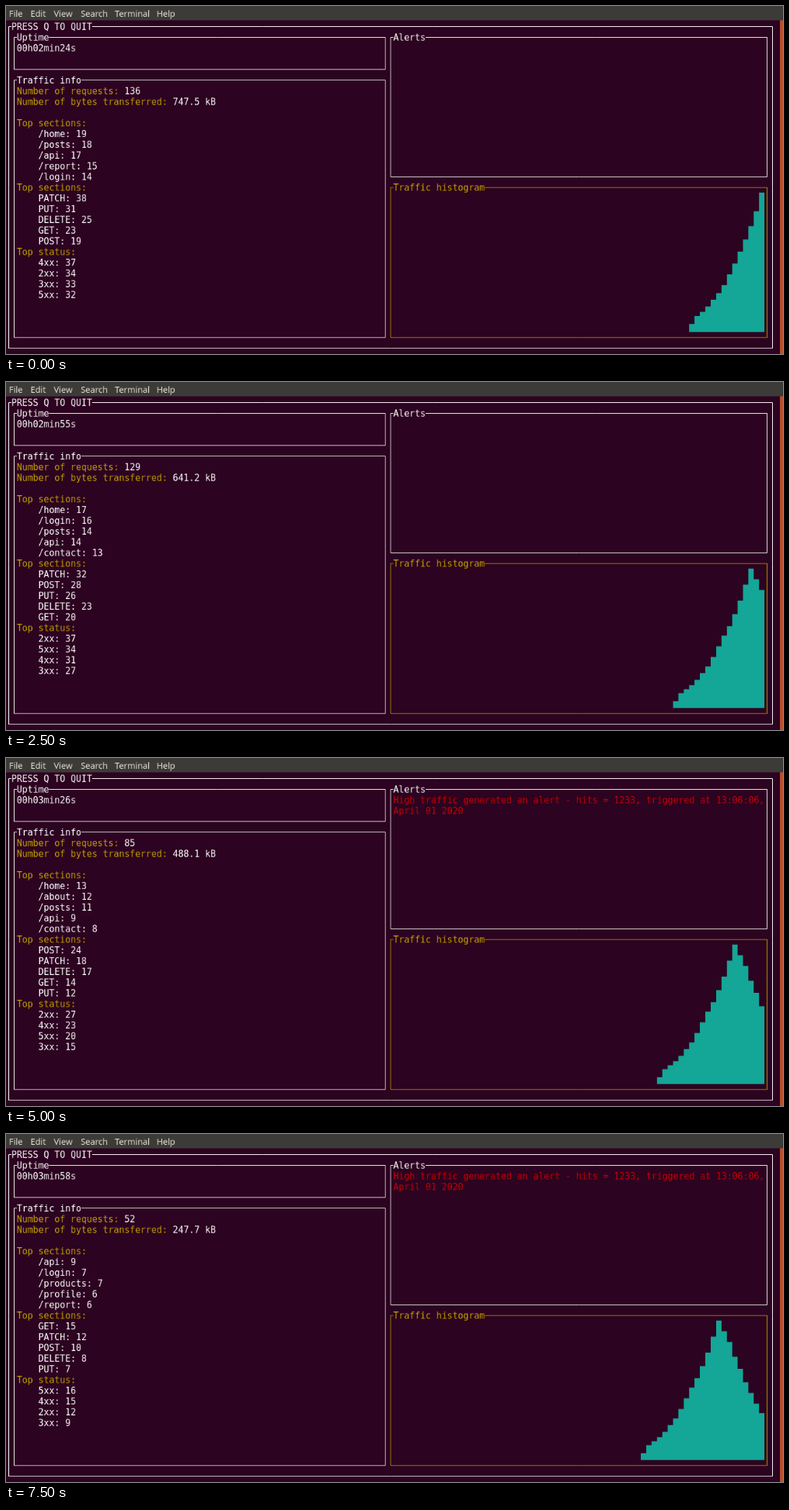
Write an HTML page with a canvas that moves like this. It is 1000 by 449 pixels and loops after 8000 ms.

```html
<!DOCTYPE html>
<html lang="en">
<head>
<meta charset="utf-8">
<title>Traffic monitor</title>
<style>
  html, body { margin: 0; width: 100%; height: 100%; overflow: hidden; background: #2c0320; }
  canvas { display: block; width: 1000px; height: 449px; }
</style>
</head>
<body>
<canvas id="stage" width="1300" height="584"></canvas>
<script>
// The terminal is drawn on its own 9 x 18 pixel grid and shown scaled down.
const canvas = document.getElementById('stage');
const ctx = canvas.getContext('2d');
const LOOP = 8000, STEP = 500;
const CELL_W = 9, CELL_H = 18, TOP = 25, BASELINE = 15;
const WHITE = '#fff', YELLOW = '#c4a000', RED = '#c80004', TEAL = '#14a697';

// Requests counted in each ten-second interval; the log below covers the last ones.
const hits = [8, 16, 20, 25, 31, 38, 46, 56, 67, 79, 90, 103, 118, 136,
              153, 141, 129, 114, 100, 85, 73, 62, 52];
const FIRST_LOGGED = 13;

// kilobytes | sections | methods | status classes
const log = [
  '747.5|home 19,posts 18,api 17,report 15,login 14|PATCH 38,PUT 31,DELETE 25,GET 23,POST 19|4xx 37,2xx 34,3xx 33,5xx 32',
  '792.6|home 20,posts 19,profile 17,api 16,cart 16|PATCH 39,PUT 33,POST 29,DELETE 28,GET 24|2xx 43,4xx 40,5xx 37,3xx 33',
  '737.4|profile 18,posts 16,home 16,api 15,cart 15|PATCH 41,POST 32,DELETE 28,PUT 27,GET 13|2xx 50,5xx 37,4xx 28,3xx 26',
  '641.2|home 17,login 16,posts 14,api 14,contact 13|PATCH 32,POST 28,PUT 26,DELETE 23,GET 20|2xx 37,5xx 34,4xx 31,3xx 27',
  '542.8|home 15,login 14,contact 13,api 13,products 13|PATCH 27,PUT 25,POST 23,GET 22,DELETE 17|2xx 32,5xx 30,4xx 29,3xx 23',
  '503.3|login 17,home 15,contact 14,posts 11,about 10|PUT 25,DELETE 23,PATCH 20,GET 16,POST 16|2xx 37,5xx 25,4xx 24,3xx 14',
  '488.1|home 13,about 12,posts 11,api 9,contact 8|POST 24,PATCH 18,DELETE 17,GET 14,PUT 12|2xx 27,4xx 23,5xx 20,3xx 15',
  '394.7|home 10,contact 10,posts 9,cart 8,about 7|POST 19,DELETE 16,PATCH 15,PUT 13,GET 10|4xx 22,2xx 19,5xx 17,3xx 15',
  '328.3|cart 8,contact 8,products 8,home 7,profile 6|DELETE 16,POST 15,PUT 13,PATCH 10,GET 8|4xx 21,5xx 17,2xx 14,3xx 10',
  '247.7|api 9,login 7,products 7,profile 6,report 6|GET 15,PATCH 12,POST 10,DELETE 8,PUT 7|5xx 16,4xx 15,2xx 12,3xx 9'
].map(line => line.split('|'));

const rowTop = row => TOP + row * CELL_H;

function write(text, col, row, color = WHITE) {
  ctx.font = '15px "DejaVu Sans Mono", monospace';
  ctx.fillStyle = color;
  [...text].forEach((char, i) =>
    ctx.fillText(char, (col + i) * CELL_W, rowTop(row) + BASELINE));
}

function field(label, value, row) {
  write(label, 2, row, YELLOW);
  write(value, 3 + label.length, row);
}

function list(title, entries, row, prefix = '') {
  write(title, 2, row, YELLOW);
  entries.split(',').forEach((entry, i) =>
    write(prefix + entry.replace(' ', ': '), 6, row + 1 + i));
}

// Lines run through cell centres; the title interrupts the top edge.
function panel(title, col, row, lastCol, lastRow, color = WHITE) {
  const x = c => (c + 0.5) * CELL_W, y = r => rowTop(r) + 9.5;
  ctx.strokeStyle = color;
  ctx.lineWidth = 1;
  ctx.beginPath();
  ctx.moveTo((col + 1) * CELL_W, y(row));
  ctx.lineTo(x(col), y(row));
  ctx.lineTo(x(col), y(lastRow));
  ctx.lineTo(x(lastCol), y(lastRow));
  ctx.lineTo(x(lastCol), y(row));
  ctx.lineTo((col + 1 + title.length) * CELL_W, y(row));
  ctx.stroke();
  write(title, col + 1, row, color);
}

function windowFrame() {
  ctx.fillStyle = '#2c0320';
  ctx.fillRect(0, 0, canvas.width, canvas.height);
  ctx.fillStyle = '#3c3b37';
  ctx.fillRect(0, 0, canvas.width, 24);
  ctx.fillStyle = '#b9502f';
  ctx.fillRect(1295, 24, 5, canvas.height);
  ctx.fillStyle = '#dfdbd2';
  ctx.font = '14.3px "Noto Sans", sans-serif';
  const items = { File: 5, Edit: 41, View: 80, Search: 125, Terminal: 182, Help: 252 };
  for (const name in items) ctx.fillText(name, items[name], 18);
}

// Bars are one cell wide and grow in eighths of a cell.
function histogram(bars) {
  const peak = Math.max(...bars), rows = 13, endCol = 141, bottom = rowTop(29);
  ctx.fillStyle = TEAL;
  bars.forEach((value, i) => {
    const height = Math.round(value / peak * rows * 8) / 8 * CELL_H;
    ctx.fillRect((endCol - bars.length + i) * CELL_W, bottom - height, CELL_W, height);
  });
}

function draw(step) {
  const uptime = Math.floor(144.3 + 6.25 * step);
  const interval = Math.floor(0.4 + 0.625 * step);
  const latest = FIRST_LOGGED + interval;
  const [bytes, sections, methods, statuses] = log[interval];
  const pad = n => String(n).padStart(2, '0');

  windowFrame();
  panel('PRESS Q TO QUIT', 0, 0, 142, 30);
  panel('Uptime', 1, 1, 70, 4);
  panel('Traffic info', 1, 5, 70, 29);
  panel('Alerts', 71, 1, 141, 14);
  panel('Traffic histogram', 71, 15, 141, 29, YELLOW);

  write(`00h${pad(Math.floor(uptime / 60))}min${pad(uptime % 60)}s`, 2, 2);
  field('Number of requests:', String(hits[latest]), 6);
  field('Number of bytes transferred:', bytes + ' kB', 7);
  list('Top sections:', sections, 9, '/');
  list('Top sections:', methods, 15);
  list('Top status:', statuses, 21);

  if (interval >= 4) {
    write('High traffic generated an alert - hits = 1233, triggered at 13:06:06,', 72, 2, RED);
    write('April 01 2020', 72, 3, RED);
  }
  histogram(hits.slice(0, latest + 1));
}

function frame() {
  draw(Math.floor(performance.now() % LOOP / STEP));
  requestAnimationFrame(frame);
}
frame();
</script>
</body>
</html>
```
